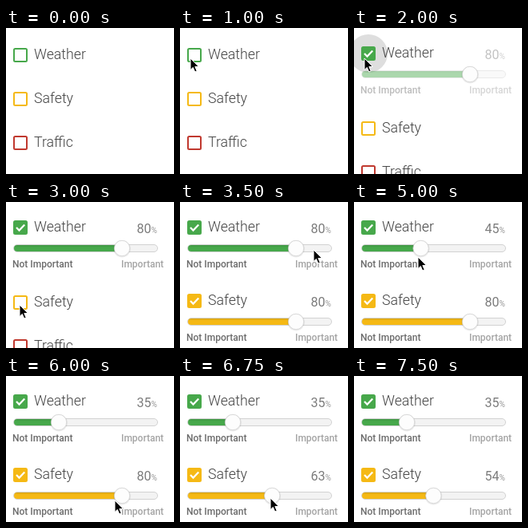
An HTML page that plays this animation: 210 px wide and 183 px high, repeating every 10 s.

```html
<!DOCTYPE html>
<html lang="en">
<head>
<meta charset="utf-8">
<title>Priority sliders</title>
<style>
  html, body { margin: 0; width: 100%; height: 100%; overflow: hidden; background: #fff; }
  svg { display: block; font-family: Roboto, sans-serif; }
  .name { font-size: 17.75px; font-weight: 300; fill: #444; }
  .value { font-size: 16px; fill: #7c7c7c; }
  .unit { font-size: 10px; fill: #999; }
  .low, .high { font-size: 12px; font-weight: 500; }
  .low { fill: #6c6c6c; }
  .high { fill: #a4a4a4; }
</style>
</head>
<body>
<svg id="stage" width="210" height="183" viewBox="0 0 210 183">
  <defs>
    <linearGradient id="shade" x2="0" y2="1">
      <stop offset="0" stop-opacity=".12"/>
      <stop offset=".35" stop-opacity="0"/>
    </linearGradient>
  </defs>
</svg>
<script>
const LOOP = 10000, TICK = 250;
const FIRST_Y = 34, CLOSED_H = 55, OPEN_H = 92;
const stage = document.getElementById('stage');

const linear = u => u;
const easeIn = u => u * u;
const easeOut = u => 1 - (1 - u) ** 2;

// Pointer trips: start time, end time, destination, easing.
const home = { x: 9, y: 19 };
const trips = [
  [500, 1000, 13, 38, easeOut],
  [2000, 2500, 32, 72, easeIn],
  [2500, 3000, 17, 129, easeOut],
  [3250, 3500, 167, 60, linear],
  [3500, 4000, 149, 63, easeIn],
  [4250, 4500, 143, 63, linear],
  [4750, 5000, 80, 69, linear],
  [5000, 5500, 64, 69, linear],
  [5750, 6000, 136, 156, linear],
  [6000, 6500, 146, 151, easeOut],
  [6500, 6750, 113, 153, linear],
  [6750, 7500, 97, 154, easeOut]
];
const items = [
  { name: 'Weather', color: '#47a84b', opens: 2000, drag: [5000, 5500] },
  { name: 'Safety', color: '#f5b915', opens: 3250, drag: [6750, 7500] },
  { name: 'Traffic', color: '#c0392f', opens: Infinity, drag: [Infinity, Infinity] }
];

function pointerAt(t) {
  let { x, y } = home;
  for (const [from, to, toX, toY, ease] of trips) {
    if (t < from) break;
    const u = ease(Math.min(1, (t - from) / (to - from)));
    x += (toX - x) * u;
    y += (toY - y) * u;
  }
  return { x, y };
}

const knobX = level => 66 + (level - 35) * 1.756;

// While dragged, the knob follows the pointer; later it stays put.
function levelAt({ drag: [from, to] }, t) {
  if (t < from) return 80;
  const x = pointerAt(Math.min(t, to)).x + 2.7;
  return Math.round(35 + (x - 66) / 1.756);
}

function add(parent, tag, attrs, text) {
  const el = document.createElementNS('http://www.w3.org/2000/svg', tag);
  for (const key in attrs) el.setAttribute(key, attrs[key]);
  if (text) el.textContent = text;
  parent.appendChild(el);
  return el;
}

const show = (el, on) => el.setAttribute('visibility', on ? 'visible' : 'hidden');
const place = (el, x, y) => el.setAttribute('transform', `translate(${x} ${y})`);

// Rows are drawn around the checkbox centre at y = 0.
function buildRow(item) {
  const g = add(stage, 'g', {});
  const ripple = add(g, 'circle', { cx: 18, r: 24, fill: '#dedede' });
  const box = add(g, 'rect', { x: 10, y: -8, width: 16, height: 16, rx: 1.5,
    stroke: item.color, 'stroke-width': 2 });
  const check = add(g, 'path', { d: 'M13 0l3.5 3.6L23.2-3.6', fill: 'none',
    stroke: '#fff', 'stroke-width': 2.2 });
  add(g, 'text', { class: 'name', x: 35, y: 5 }, item.name);

  const panel = add(g, 'g', {});
  const value = add(panel, 'text', { class: 'value', x: 163.5, y: 7 });
  add(panel, 'text', { class: 'unit', x: 181.5, y: 7 }, '%');
  add(panel, 'rect', { x: 9.5, y: 21.5, width: 180, height: 9, rx: 4.5,
    fill: '#f3f3f3', stroke: '#d2d2d2' });
  const fills = [item.color, 'url(#shade)'].map(fill =>
    add(panel, 'rect', { x: 10, y: 22, height: 8, rx: 4, fill }));
  add(panel, 'text', { class: 'low', x: 8, y: 50 }, 'Not Important');
  add(panel, 'text', { class: 'high', x: 144, y: 50 }, 'Important');
  const knob = add(g, 'g', {});
  add(knob, 'circle', { cy: 0.6, r: 10.8, fill: '#000', 'fill-opacity': .08 });
  add(knob, 'circle', { r: 9.7, fill: '#fdfdfd', stroke: '#d2d2d2', 'stroke-width': .8 });

  return (t, y) => {
    const open = t >= item.opens;
    const fresh = open && t < item.opens + TICK;
    const level = levelAt(item, t);
    place(g, 0, open ? y - 2 : y);
    show(ripple, fresh);
    for (const el of [check, panel, knob]) show(el, open);
    box.setAttribute('fill', open ? item.color : '#fff');
    panel.setAttribute('opacity', fresh ? .45 : 1);
    value.textContent = level;
    for (const el of fills) el.setAttribute('width', knobX(level) - 10);
    place(knob, knobX(level), 26);
    return y + (open ? OPEN_H : CLOSED_H);
  };
}

const rows = items.map(buildRow);
const cursor = add(stage, 'path', {
  d: 'M0 0V14.5L3.3 11.4L5.7 17L8.2 16L5.8 10.5H10.4Z',
  fill: '#000', stroke: '#fff', 'stroke-width': 1
});

function draw(time) {
  const t = Math.floor(time / TICK) * TICK;
  rows.reduce((y, update) => update(t, y), FIRST_Y);
  const { x, y } = pointerAt(t);
  place(cursor, Math.round(x), Math.round(y));
  show(cursor, t >= 500 && t < 7500);
}

const start = performance.now();
function frame(now) {
  draw(Math.max(0, now - start) % LOOP);
  requestAnimationFrame(frame);
}
draw(0);
requestAnimationFrame(frame);
</script>
</body>
</html>
```
